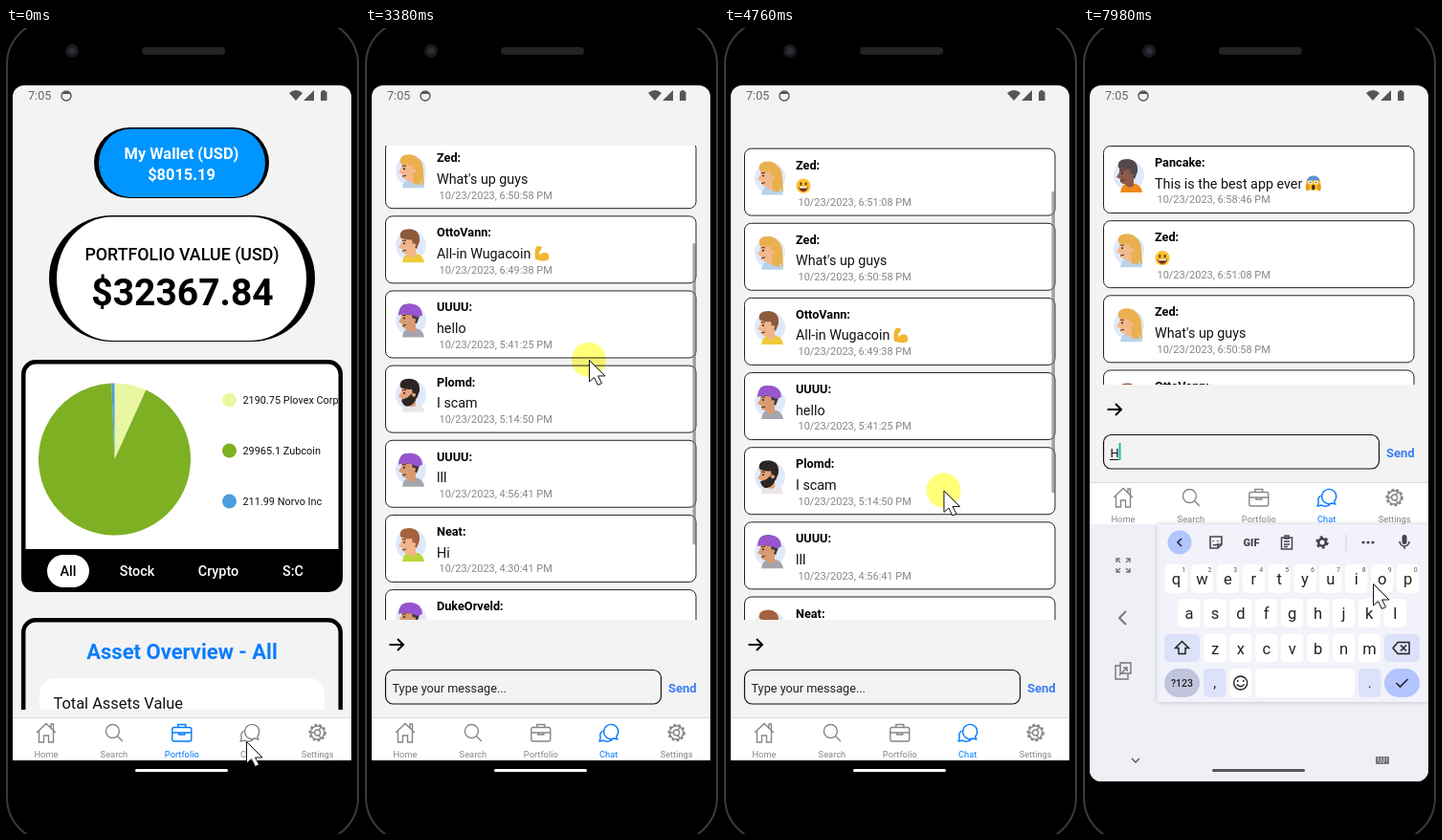
An HTML page with a canvas for the animation above (8000 ms loop, 369 by 843 pixels).

```html
<!DOCTYPE html>
<html lang="en">
<head>
<meta charset="utf-8">
<title>Wallet app</title>
<style>
html, body { margin: 0; width: 100%; height: 100%; overflow: hidden; background: #000; }
canvas { display: block; }
</style>
</head>
<body>
<canvas id="stage" width="369" height="843"></canvas>
<script>
const c = document.getElementById('stage').getContext('2d');
const LOOP = 8000, BG = '#f3f3f3', BLUE = '#007aff', GREY = '#86868a', INK = '#111';
const TAU = Math.PI * 2;

// --- drawing helpers -------------------------------------------------------
function box(x, y, w, h, r, fill, stroke, lw = 1) {
  c.beginPath();
  c.roundRect(x, y, w, h, r);
  paint(fill, stroke, lw);
}
function dot(x, y, r, fill, stroke, lw = 1, ry = r) {
  c.beginPath();
  c.ellipse(x, y, r, ry, 0, 0, TAU);
  paint(fill, stroke, lw);
}
function paint(fill, stroke, lw) {
  if (fill) { c.fillStyle = fill; c.fill(); }
  if (stroke) { c.strokeStyle = stroke; c.lineWidth = lw; c.stroke(); }
}
// y is the middle of the capital letters
function text(s, x, y, size, color = INK, weight = 400, align = 'left') {
  c.font = `${weight} ${size}px Roboto, sans-serif`;
  c.textAlign = align;
  c.fillStyle = color;
  c.fillText(s, x, y + size * 0.356);
}
function shape(d, x, y, fill, stroke, lw = 1.4) {
  const p = new Path2D(d);
  at(x, y, () => {
    if (fill) { c.fillStyle = fill; c.fill(p); }
    if (stroke) { c.strokeStyle = stroke; c.lineWidth = lw; c.stroke(p); }
  });
}
function at(x, y, draw) {
  c.save();
  c.translate(x, y);
  draw();
  c.restore();
}
function clipped(x, y, w, h, r, draw) {
  c.save();
  c.beginPath();
  c.roundRect(x, y, w, h, r);
  c.clip();
  draw();
  c.restore();
}

// --- timing ----------------------------------------------------------------
// keys: [time, value, value...] joined by straight segments
function track(keys, t) {
  const i = keys.findIndex(k => k[0] > t);
  if (i < 0) return keys.at(-1).slice(1);
  if (i === 0) return keys[0].slice(1);
  const a = keys[i - 1], b = keys[i], f = (t - a[0]) / (b[0] - a[0]);
  return a.slice(1).map((v, n) => v + (b[n + 1] - v) * f);
}
const pointer = [
  [30, 251, 746], [90, 249, 740], [1160, 249, 740], [1480, 212, 540], [1650, 212, 540],
  [1710, 210, 551], [2690, 210, 551], [2860, 214, 518], [3090, 214, 518], [3380, 234, 347],
  [3880, 240, 318], [4060, 240, 312], [4230, 240, 312], [4430, 239, 327], [5020, 222, 606],
  [5170, 219, 635], [5810, 213, 699], [6000, 213, 699], [6080, 213, 689], [7030, 213, 689],
  [7350, 243, 606], [7600, 243, 606], [7810, 289, 587], [7860, 289, 587], [7980, 303, 581]];
const scrolling = [[2690, 0], [2860, 22], [3090, 22], [3380, 161], [3880, 222], [4060, 230],
  [4230, 230], [4430, 223.5], [4930, 0]];
const stretching = [[4930, 1], [5170, 1.0175], [5350, 1.02], [5600, 1]];
const barFade = [[2250, 0], [2450, 1], [5500, 1], [5800, 0]];
const presses = [[400, 530], [2110, 5400], [6120, 6270], [7400, 7560]];
const CHAT_AT = 730, FOCUS_AT = 6280, KEYS_AT = 6560, LIFT_AT = 6700, TYPED_AT = 7500;

// --- phone -----------------------------------------------------------------
function phone() {
  c.fillStyle = '#000';
  c.fillRect(0, 0, 369, 843);
  box(1, -8, 367, 859, 46, null, '#3b3b3e', 2);
  dot(69, 24, 7, '#1b1b1d');
  dot(69, 24, 3.5, '#2b3038');
  box(142, 20, 87, 8, 4, '#232325');
}
function statusBar() {
  text('7:05', 23, 71, 12.6, '#666');
  dot(63, 71, 5, null, '#555', 1.4);
  shape('M-4-2H4V-4H-4Z', 63, 71, '#555');
  shape('M296 68Q303 62 310 68L303 76ZM311 76H322V65ZM329 66.500H330.500V65H333.500V66.500H335.500V76H329Z', 0, 0, '#555');
}

const tabs = [
  ['Home', 'M-10 0L0-9.500L10 0M-7.500-2V10H-2.500V3H2.500V10H7.500V-2M5-5V-9H7.500V-2.500'],
  ['Search', 'M5.500-1.500A7-7 0 1 1-8.500-1.500A7 7 0 1 1 5.500-1.500M3.500 3.500L9 9'],
  ['Portfolio', 'M-8-5.500H8Q10-5.500 10-3.500V7Q10 9 8 9H-8Q-10 9-10 7V-3.500Q-10-5.500-8-5.500ZM-4-5.500V-8.500H4V-5.500M-10 0H10M-3 0V2H3V0'],
  ['Chat', 'M-5-1A7.500 7.500 0 1 1 8 4L9 7L5.500 6A7.500 7.500 0 0 1-5-1M-6-2A6 6 0 0 0-8.500 5L-9.500 9L-5.500 8A7 7 0 0 0 4 6.500'],
  ['Settings', 'M3 0A3 3 0 1 1-3 0A3 3 0 1 1 3 0M7 0A7 7 0 1 1-7 0A7 7 0 1 1 7 0M-3 0H-7M1.500-2.600L3.500-6M1.500 2.600L3.500 6']];
function tabBar(active) {
  c.fillStyle = '#fff';
  c.fillRect(7, 721, 354, 45);
  c.fillStyle = '#d9d9dc';
  c.fillRect(7, 721, 354, 1);
  tabs.forEach(([label, d], i) => {
    const x = 42 + i * 70.9, color = i === active ? BLUE : GREY;
    shape(d, x, 737, null, color);
    if (i === 4) {
      c.setLineDash([2.8, 2.22]);
      dot(x, 737, 8.2, null, color, 2);
      c.setLineDash([]);
    }
    text(label, x, 760, 9.3, color, 400, 'center');
  });
}

// --- portfolio -------------------------------------------------------------
function portfolio() {
  box(92, 104, 183, 74, 37, '#000');
  box(97, 105.5, 174, 71.5, { x: 33, y: 35.7 }, '#0095ff');
  text('My Wallet (USD)', 183.5, 131, 16.4, '#fff', 700, 'center');
  text('$8015.19', 183.5, 153, 16.4, '#fff', 700, 'center');

  box(45, 196, 278, 132, 66, '#000');
  box(53, 197.5, 261, 129.5, { x: 58, y: 64.7 }, '#fff');
  text('PORTFOLIO VALUE (USD)', 184, 237, 17.8, '#000', 500, 'center');
  text('$32367.84', 184.5, 276, 39, '#000', 700, 'center');

  box(16, 347, 336, 243, 15, '#000');
  box(20.5, 351.5, 327, 193.5, [11, 11, 0, 0], '#fff');
  const assets = [[2190.75, 'Plovex Corp', '#e9f7a3'], [29965.1, 'Zubcoin', '#7eb024'], [211.99, 'Norvo Inc', '#4a9edb']];
  const total = assets.reduce((sum, a) => sum + a[0], 0);
  let angle = -TAU / 4;
  clipped(20, 351, 327.5, 194, 0, () => assets.forEach(([value, name, color], i) => {
    const end = angle + TAU * value / total, y = 389 + 53 * i;
    c.beginPath();
    c.moveTo(113.5, 451);
    c.arc(113.5, 451, 79.5, angle, end);
    paint(color);
    angle = end;
    dot(233.5, y, 7.5, color);
    text(`${value} ${name}`, 247.5, y, 10.9);
  }));
  box(43, 551, 44, 34, 17, '#fff');
  [['All', 65], ['Stock', 137], ['Crypto', 222], ['S:C', 300]].forEach(([label, x], i) =>
    text(label, x, 568, 14.4, i ? '#fff' : '#000', 500, 'center'));

  clipped(7, 600, 354, 113, 0, () => {
    box(18.2, 619.2, 331.5, 150, 13, null, '#000', 4.5);
    text('Asset Overview - All', 184, 652, 22, '#0a7cff', 700, 'center');
    box(35, 680, 298, 90, 16, '#fff');
    text('Total Assets Value', 49.5, 706, 16.4);
  });
}

// --- chat ------------------------------------------------------------------
const looks = {
  dark: { skin: '#8a5a4a', hair: '#55484c', shirt: '#f08a1c' },
  blond: { skin: '#f3b98c', hair: '#eab04e', shirt: '#b9d2ea', long: true },
  brown: { skin: '#f0b58a', hair: '#8d5a3c', shirt: '#f0c93a' },
  hat: { skin: '#d99a72', hair: '#43363a', shirt: '#a5a5ad', hat: true },
  beard: { skin: '#e2a47c', hair: '#2c2523', shirt: '#e9e6ea', beard: true },
  green: { skin: '#f0b58a', hair: '#a5623f', shirt: '#b9d63a' }
};
const rows = [
  ['Pancake', 'This is the best app ever ', '6:58:46', 'dark', 'scream'],
  ['Zed', '', '6:51:08', 'blond', 'grin'],
  ['Zed', 'What\'s up guys', '6:50:58', 'blond'],
  ['OttoVann', 'All-in Wugacoin ', '6:49:38', 'brown', 'arm'],
  ['UUUU', 'hello', '5:41:25', 'hat'],
  ['Plomd', 'I scam', '5:14:50', 'beard'],
  ['UUUU', 'lll', '4:56:41', 'hat'],
  ['Neat', 'Hi', '4:30:41', 'green'],
  ['DukeOrveld', '11', '4:28:24', 'hat'],
  ['DukeOrveld', '1', '4:27:50', 'hat']];
const PITCH = 78.15, TOP = 123;

function avatar(look, t) {
  const { skin, hair, shirt, long, hat, beard } = looks[look];
  dot(1, 0, 16, '#dfe9fa');
  if (long) shape('M-3-13Q13-18 14 0L15 15Q7 19 1 13Z', 0, 0, hair);
  shape('M-8 18Q-7 9 1 8L8 9Q14 11 15 18Z', 0, 0, shirt);
  shape('M-2 4H6V11Q2 14-2 11Z', 0, 0, skin);
  shape('M-9-8Q-2-15 6-9Q10 0 4 7Q-3 12-8 7L-8 4L-12 2L-9-3Z', 0, 0, skin);
  if (beard) shape('M-9 5L-3 3L4-3L7 2Q5 11-3 12Q-8 11-9 5Z', 0, 0, hair);
  shape('M-10-8Q-12-17 0-17Q11-16 10-4L7 4L3 0L2-6Q-4-5-10-8Z', 0, 0, hair);
  if (long) shape('M2-8Q12-8 11 15L4 14Z', 0, 0, hair);
  if (hat) shape('M-12-5Q-12-17 0-17Q12-17 13-5L8-3Q-2-9-12-5Z', 0, 0, t < 2690 ? '#7d97c9' : '#9855cf');
  dot(4, 0, 2, skin);
  dot(-6, -2, 1, '#222');
  shape('M-8 6L-4 5M-8-5L-4-5', 0, 0, null, '#4a2a22', 1);
}

function emoji(kind, x, y) {
  if (kind === 'arm') {
    shape('M-7-4L-5-8L0-7L-1-3L-3-2L-2 2Q1-3 6 0Q9 4 6 7Q0 9-7 6Q-8 2-7-4Z', x, y, '#f2b632');
    return;
  }
  dot(x, y, 7.6, '#fbc12d');
  if (kind === 'grin') {
    dot(x - 2.7, y - 2, 1.1, '#5a3a10', null, 1, 1.8);
    dot(x + 2.7, y - 2, 1.1, '#5a3a10', null, 1, 1.8);
    shape('M-5 1H5Q4 6 0 6Q-4 6-5 1Z', x, y, '#7a2b1a');
    shape('M-4 1H4V2.500H-4Z', x, y, '#fff');
  } else {
    shape('M-7-3Q-5-8 0-8Q5-8 7-3Z', x, y, '#5b8fd6');
    dot(x - 3, y - 1, 2, '#fff');
    dot(x + 3, y - 1, 2, '#fff');
    dot(x - 3, y - 1, 0.8, '#222');
    dot(x + 3, y - 1, 0.8, '#222');
    dot(x, y + 4, 1.8, '#4a2a1a', null, 1, 2.8);
    dot(x - 6, y + 4, 2, '#e89a1c', null, 1, 4);
    dot(x + 6, y + 4, 2, '#e89a1c', null, 1, 4);
  }
}

function loaded(i, t) {
  if (i === 0) return t > 2200 && (t < 4600 || t > 5450);
  if (i < 3) return t >= 2690;
  return i > 3 || t > 2350;
}

function messages(t) {
  const [scroll] = track(scrolling, t), [stretch] = track(stretching, t);
  c.translate(0, TOP);
  c.scale(1, stretch);
  rows.forEach(([name, message, time, look, face], i) => at(0, i * PITCH - scroll, () => {
    box(21.5, 0.5, 324.5, 70, 7, '#fff', '#222');
    text(name + ':', 75, 17.5, 12.7, '#000', 700);
    text(message, 75, 39.5, 14.3);
    if (face) emoji(face, 83 + c.measureText(message).width, 39.5);
    text(`10/23/2023, ${time} PM`, 77.5, 56.5, 10.95, '#868686');
    if (loaded(i, t)) at(47, 31, () => avatar(look, t));
  }));
  c.globalAlpha = track(barFade, t)[0];
  box(342.5, scroll * 0.635, 3.5, 315, 0, 'rgba(110,110,110,.6)');
  c.globalAlpha = 1;
}

function chat(t) {
  const lift = t >= LIFT_AT ? 246 : 0, typed = t >= TYPED_AT;
  clipped(7, TOP, 354, 496 - lift, 0, () => messages(t));
  at(0, -lift, () => {
    shape('M-7.500 0H7M1-6L7 0L1 6', 33, 645, null, '#000', 2);
    box(21.5, 671.5, 288, 35.5, 8, BG, '#111', 1.2);
    if (typed) {
      text('H', 28.5, 690, 12.7);
      c.fillRect(28, 697, 9.5, 1);
    } else text('Type your message...', 28.5, 690, 12.7, '#222');
    const blink = typed ? t - TYPED_AT : t - FOCUS_AT;
    if (blink >= 0 && blink % 1000 < 500) {
      c.fillStyle = '#13bfae';
      c.fillRect(typed ? 37.5 : 28.5, 680, 2, 18);
    }
    text('Send', 317, 690, 13, '#3a7df2', 700);
    tabBar(3);
  });
}

// --- keyboard --------------------------------------------------------------
const KEY = 26.9, LILAC = '#dce2f9', PERI = '#b3c5fd', SLATE = '#44464f';
function keyRow(letters, x, y, upper) {
  [...letters].forEach((ch, i) => {
    const kx = x + i * KEY;
    box(kx - 11.7, y - 15, 23.4, 30, 5, '#fff');
    text(upper ? ch.toUpperCase() : ch, kx, y + 0.5, 16.5, '#222', 400, 'center');
    if (letters.length === 10) text((i + 1) % 10, kx + 8, y - 9, 7, '#555', 400, 'center');
  });
}
function keyboard(t) {
  c.fillStyle = '#efeff6';
  c.fillRect(7, 519, 354, 270);
  c.shadowColor = 'rgba(0,0,0,.25)';
  c.shadowBlur = 4;
  box(77.5, 519, 290, 186, 0, '#f2f2fa');
  c.shadowColor = 'transparent';

  shape('M-7-3V-7H-3M3-7H7V-3M7 3V7H3M-3 7H-7V3M-7-7L-3-3M7-7L3-3M7 7L3 3M-7 7L-3 3', 42, 562, null, '#777');
  shape('M3-7L-4 0L3 7', 42, 617, null, '#777', 2);
  shape('M-3-5H-8V9H5V4M-3-8H8V3H-3ZM-4 5L4-3M0-3H4V1', 42, 672, null, '#777');

  dot(101, 538, 12.5, PERI);
  shape('M2-4L-2 0L2 4', 101, 538, null, '#223', 1.6);
  shape('M-6-6H6V2L2 6H-6ZM6 2H2V6M-3-2V-1M2-2V-1M-3 2Q-1 4 1 2', 139, 538, null, SLATE, 1.6);
  text('GIF', 176, 538, 11, SLATE, 900, 'center');
  shape('M-5.500-5H5.500V7H-5.500ZM-2-7H2V-4H-2ZM-3-1H3M-3 2H3M-3 4.500H1', 213, 538, null, SLATE, 1.5);
  c.setLineDash([2.6, 2.63]);
  dot(250, 538, 5, null, SLATE, 3.4);
  c.setLineDash([]);
  dot(250, 538, 3.8, null, SLATE, 2.6);
  c.fillStyle = '#ccccd4';
  c.fillRect(274.5, 530, 1, 17);
  [293, 298, 303].forEach(x => dot(x, 538, 1.6, SLATE));
  box(333.5, 530, 5, 10, 2.5, SLATE);
  shape('M-5-1A5 5 0 0 0 5-1M0 4V7', 336, 538, null, SLATE, 1.6);

  const upper = t < TYPED_AT;
  keyRow('qwertyuiop', 97.5, 576, upper);
  keyRow('asdfghjkl', 111, 612, upper);
  keyRow('zxcvbnm', 138, 648.5, upper);
  box(85, 634, 37, 29, 5, LILAC);
  shape('M0-7L7 0H3.500V6H-3.500V0H-7Z', 103.5, 648.5, upper ? '#222' : null, '#222', 1.5);
  box(315, 634, 37, 29, 5, LILAC);
  shape('M-4-6H8V6H-4L-9 0ZM-1-3L5 3M5-3L-1 3', 333, 648.5, null, '#222', 1.5);

  box(85, 670, 37, 30, 15, '#c0c5dd');
  text('?123', 103.5, 685.5, 10.5, '#222', 500, 'center');
  box(126, 670, 23.4, 30, 5, LILAC);
  text(',', 137.7, 685, 15, '#222', 400, 'center');
  box(153, 670, 23.4, 30, 5, '#fff');
  dot(164.7, 685, 7, null, '#222', 1.4);
  shape('M-3-3V-1M3-3V-1M-4 1.500Q0 6 4 1.500', 164.7, 685, null, '#222');
  box(180, 670, 104, 30, 5, '#fff');
  box(288, 670, 23.4, 30, 5, LILAC);
  text('.', 299.7, 685, 15, '#222', 400, 'center');
  box(315, 670, 37, 30, 15, PERI);
  shape('M-6 0L-2 4L6-4', 333.5, 685, null, '#223', 1.6);

  shape('M-4-2L0 2L4-2', 55, 766, null, '#555', 1.4);
  box(306, 762, 14, 8, 1, '#777');
  c.setLineDash([1.5, 1.5]);
  shape('M-5-1.500H5M-5 0.500H5M-3 2.500H3', 313, 765.5, null, '#efeff6', 1);
  c.setLineDash([]);
}

// --- pointer ---------------------------------------------------------------
function cursor(t) {
  const [x, y] = track(pointer, t);
  if (presses.some(([from, to]) => t >= from && t < to)) {
    c.globalCompositeOperation = 'multiply';
    dot(x, y, 18, '#ffff78');
    c.globalCompositeOperation = 'source-over';
  }
  shape('M.5 .5V23L5.500 18.500L9.500 26.500L13.500 24.500L9.500 17H17Z', x, y, '#fff', '#111', 1);
}

function frame(now) {
  const t = now % LOOP, open = t >= KEYS_AT;
  phone();
  clipped(7, 60, 354, open ? 728 : 706, open ? 12 : [12, 12, 0, 0], () => {
    c.fillStyle = BG;
    c.fillRect(7, 60, 354, 728);
    statusBar();
    if (t < CHAT_AT) {
      portfolio();
      tabBar(2);
    } else chat(t);
    if (open) {
      const rest = 1 - Math.min(1, (t - KEYS_AT) / 320);
      at(0, 269 * rest ** 3, () => keyboard(t));
    }
  });
  box(135, 775, 97, 3, 1.5, open ? '#55565c' : '#fff');
  cursor(t);
  requestAnimationFrame(frame);
}
requestAnimationFrame(frame);
</script>
</body>
</html>
```
